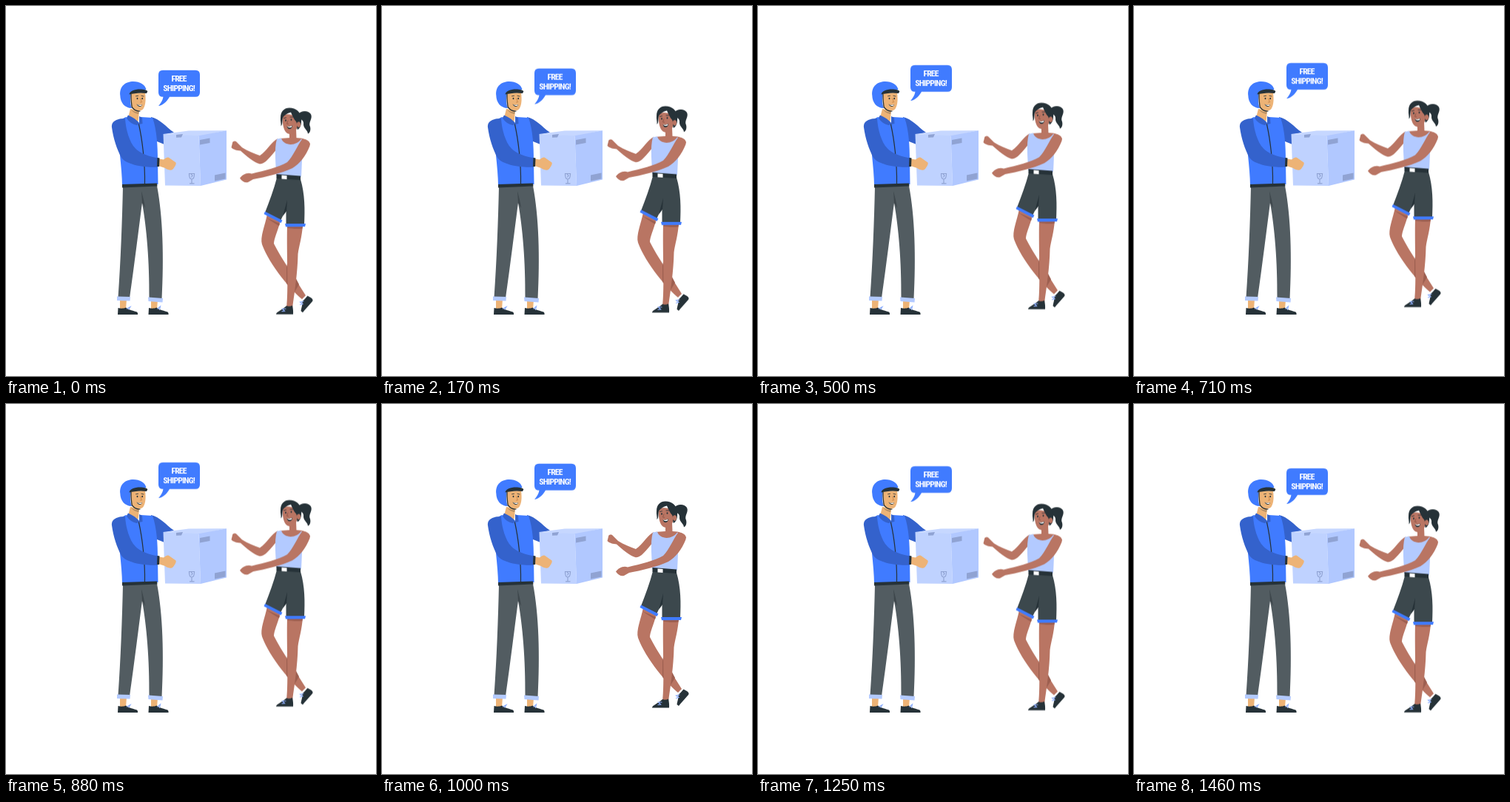
Animation of 500 by 500 pixels, one loop 1500 ms. Source, as an HTML page:

```html
<!DOCTYPE html>
<html lang="en">
<head>
<meta charset="utf-8">
<title>Free shipping</title>
<style>
  html, body { margin: 0; width: 100%; height: 100%; overflow: hidden; background: #fff; }
  svg { display: block; width: 100%; height: 100%; }
  .float { animation: float 1500ms linear -25ms infinite; }
  @keyframes float {
    0%, 100% { transform: translateY(.5px); }
    50% { transform: translateY(-9.8px); }
  }

  .blue { fill: #407bff; }
  .navy { fill: #3462cc; }
  .pale { fill: #b3caff; }
  .ink { fill: #263238; }
  .tan { fill: #edb376; }
  .brown { fill: #b97563; }
  .shade { fill: #9d5f50; }
  .slacks { fill: #525c61; }
  .shorts { fill: #3c484d; }
  .mark { fill: #90a3d3; }
  .white { fill: #fff; }
  .line { fill: none; stroke: #263238; stroke-linecap: round; stroke-linejoin: round; }
  .lace { fill: none; stroke: #8fb0ff; stroke-width: 1.2; stroke-linecap: round; }
  text {
    font: 600 11.7px "Roboto Condensed", "Open Sans Condensed", Roboto, "Open Sans", sans-serif;
    font-stretch: 75%;
    letter-spacing: -.85px;
    text-anchor: middle;
    fill: #fff;
  }
</style>
</head>
<body>
<svg viewBox="0 0 500 500">
  <!-- courier: legs and shoes -->
  <g>
    <path class="tan" d="M154 396H163L162 410H154ZM196 397H205L204 410H196Z"/>
    <path class="slacks" d="M158 244C157 290 155 345 151.500 394L167 395C173.500 350 179.500 300 184 266C190 300 194 345 193.500 395L210.500 396C213.500 340 212 285 204 243Z"/>
    <path fill="#3e474c" d="M183 250C185 258 187 265 188 273L184 266Z"/>
    <path class="pale" d="M150 392.500L168 393L167.500 398.500L150 398ZM192 393.500L212 395L211.500 400.500L192.500 399Z"/>
    <path class="ink" id="shoe" d="M151 417L151.500 408C155 409 159 409 162 407.500C166 411 173 412 177 413.500C178 414.500 178.300 416 178 417Z"/>
    <use href="#shoe" x="41.500"/>
    <path class="lace" d="M163.500 409L168 406.500L166 410M205 409L208.500 406L207.500 410.500"/>
  </g>

  <!-- courier: far arm, head and jacket -->
  <path class="navy" d="M196 150C207 152 216 163 227 171L213 174L214 187L199 181Z"/>
  <path class="tan" d="M168 139L180 141L179 153C178 160 171 160 165 151Z"/>
  <path class="ink" d="M169 140C173 143 177 144.500 180 143L179 146C174 145 171 143 169 140Z" opacity=".3"/>
  <path class="tan" d="M168 118L188 117C189 126 189 133 185.500 139C181 144 173 141 169 137Z"/>
  <path class="blue" d="M154.300 121C153 108 162 102 172 102C181 102 188 106 189.500 113L169 118C167.500 126 168 133 170 138C160 138 154.500 130 154.300 121Z"/>
  <path class="ink" d="M166.500 119.500C167 115 174 112.500 181 112.500C186 112.500 191 113.500 191.300 115.500L190 118C181 116.500 173 118 166.500 119.500Z"/>
  <path class="line" stroke-width="1.200" d="M169 119C169 126 169.500 133 170.500 137C173 140 177 142.500 181 142"/>
  <g class="ink">
    <ellipse cx="177.500" cy="125" rx=".9" ry="1.300"/>
    <ellipse cx="184.200" cy="125" rx=".9" ry="1.300"/>
    <path d="M176.500 132.500C179 134 182 134 184 133C183.500 137 178 137 176.500 132.500Z"/>
  </g>
  <path class="white" d="M177 132.900C179.500 134 182 134 183.700 133.300L183 134.700C181 135.300 179 134.700 177 132.900Z"/>
  <path class="line" stroke-width=".8" d="M175.500 121.800L178.500 121.300M183 121.300L186 122"/>
  <path fill="none" stroke="#c57f45" stroke-width=".8" d="M181.500 124.500L183.500 130L181 130"/>

  <path class="blue" d="M162 150C169 153 175 157 180 160L182 150L198 151C204 168 205 190 205 208L205.500 241L157 243C157 219 151 184 151 159C154 154 158 152 162 150Z"/>
  <path class="navy" d="M165 147.500C171 150 177 154 181 159L177 161C171 160 165 156 163 151ZM180 149L184 151L184.500 159L180 160Z"/>
  <path class="line" stroke-width="1.200" d="M179.500 160C184 180 188 212 187.500 240"/>
  <path class="ink" d="M157 241L204 239.500L204.500 243.500L157 245.500Z"/>

  <!-- parcel -->
  <g>
    <path fill="#c6d7ff" d="M212.500 173L247 168.500L298 168.300L261 176Z"/>
    <path fill="#bfd2ff" d="M212.500 173L260.500 175.300L263 243L215 242.500Z"/>
    <path fill="#b1c8ff" d="M260.500 175.300L298 168.300V234.500L263 243Z"/>
    <path class="mark" d="M230 174L239 173L237 177.500L230 177.800ZM262 181L275.500 178.500V185L262 187.500ZM282 228.500L296.500 225.500V233.500L282 236.500Z"/>
    <path fill="none" stroke="#90a3d3" stroke-width="1.200" d="M247.500 226.500H254.500C254.500 231 253.500 234 251 234C248.500 234 247.500 231 247.500 226.500ZM251 234V239.500M248 239.800H254.500M250 227L252 229L250.500 231.500"/>
  </g>

  <!-- courier: near arm -->
  <path class="navy" d="M161 152C151 152 142 155 143 164C145 179 150 194 156 205C163 215 190 219 205 217.500L206 205.500C195 204 180 199 174.500 192C167 184 162 168 161 152Z"/>
  <path class="tan" d="M206 206.500L213 207.500C217 204.500 219 203.500 221 205.500L229.500 211.500C230.500 214 228 217 226 220C224 223 219 222 215 219L206 216Z"/>
  <path class="ink" d="M204.500 205L207.500 205.500L207 217L204 217Z"/>

  <!-- speech bubble -->
  <g class="float">
    <path class="blue" d="M212 86.500H256Q262 86.500 262 92.500V116.500Q262 122.500 256 122.500H221C218 128 213 133.500 206 135C209 131 212 127 212.500 122.500H212Q206 122.500 206 116.500V92.500Q206 86.500 212 86.500Z"/>
    <text x="233.600" y="102.200">FREE</text>
    <text x="233.600" y="114.500">SHIPPING!</text>
  </g>

  <!-- customer -->
  <g class="float">
    <path class="brown" d="M353 281L371 290C367 304 362 315 362 321C372 341 391 368 405 391L400 396C387 386 356 350 346 322C343 312 350 297 353 281Z"/>
    <path class="shade" d="M379 354L380 348C385 356 391 366 396 376L390 386L379 375ZM352 286L370 294L369 297C363 293 357 290 352 286Z"/>
    <path class="ink" d="M400.500 399C403 397 405 394 407.500 391.500L412 394C415 396 415 398 414 399C409 405 404 410 401 414L398.500 412C399 408 401 403 400.500 399Z"/>
    <path class="lace" d="M402 399L397.500 400L401 402.500L397.500 403.500"/>
    <path class="brown" d="M380 296H401C400 312 396 324 394.500 335C394 361 390 386 387 408H379C382 381 379 338 380 296Z"/>
    <path class="shade" d="M380 298H401L400.500 300.500C394 301.500 386 301 380 299.500Z"/>
    <path class="ink" d="M365 416.500C365 413 373 411 379 405C382 406 384 406 387 404.500C388 409 388.300 413 388 416.500Z"/>
    <path class="lace" d="M378 409L373.500 409L376.500 412L373 412.500"/>

    <path class="brown" d="M367 179C359 183 352 196 343 202C335 199 327 196 319 191L311 183C308 182 306 183 306 185L304.500 191C307 194 312 195 317 195.500C325 203 335 211 342 213C346 214 350 211 353 208C358 203 362 198 366 193Z"/>
    <path class="brown" d="M383 170L392 166L392.500 178C401 178 411 181 411 187L400 194L368 190L369 179L383 178Z"/>
    <path class="pale" d="M366 179.500L372 178.500C375 189 392 190 399 179.500L402 181C400 195 400 215 399 231L365 229C365 214 362 194 366 179.500Z"/>

    <path class="shorts" d="M366 232L398 234C404 254 404 275 403 295H378.500L378.500 274L371 290L350 279C356 263 362 248 366 232Z"/>
    <path class="ink" d="M365.500 227L398 229.500V235L365.500 233ZM380 262L379 277L374 284Z"/>
    <path class="white" d="M372.500 228.500L379.500 229V234L372.500 233.500Z"/>
    <path class="blue" d="M350 277.500L373.500 289.500L371.500 293L348.500 281ZM377 294L405 294L404 298L378 298.300Z"/>
    <path class="brown" d="M400 180C406 179.500 412 183 410.500 189C405 203 397 213 387 219C372 226 350 231 334 234L327 238C323 239 319 237 316 232.500C319 228 326 224 332 226.500C350 222 368 218 380 211C388 203 394 188 400 180Z"/>

    <path class="ink" d="M394 147C398 141 408 140 412 146C415 152 408 157 411 163C412 167 411 171 408 172.500C408 168 402 165 402 160C403 155 399 152 394 152Z"/>
    <path class="brown" d="M374 148C382 144 394 147 394 156C395 166 390 173 384 173C375 173 373 158 374 148Z"/>
    <path class="ink" d="M371 151C371 142 376 137.500 383 137.500C392 137.500 398 143 399 151C399.500 158 399 164 394 167C392 163 394 159 392 156C389 153 387 148 385 143.500C381 144.500 376 147 374 151C373 156 374 160 371.500 162C372 158 370.500 155 371 151Z"/>
    <ellipse class="brown" cx="395.500" cy="160" rx="2.600" ry="3.700"/>
    <g class="ink">
      <ellipse cx="378" cy="154.500" rx=".9" ry="1.300"/>
      <ellipse cx="385.500" cy="153.500" rx=".9" ry="1.300"/>
      <path d="M379.500 162.500C382 163 385 162.500 387 161C387 167 381 168 379.500 162.500Z"/>
    </g>
    <path class="white" d="M380 162.600C382 163 385 162.500 386.500 161.500L386 163.500C384 164.500 381.500 164.500 380 162.600Z"/>
    <path class="line" stroke-width=".8" d="M375.500 151.500L378.500 150.800M384 150L387.500 150"/>
    <path fill="none" stroke="#8e5446" stroke-width=".9" d="M381 154.500L379.500 159L382 159.300"/>
  </g>
</svg>
</body>
</html>
```
